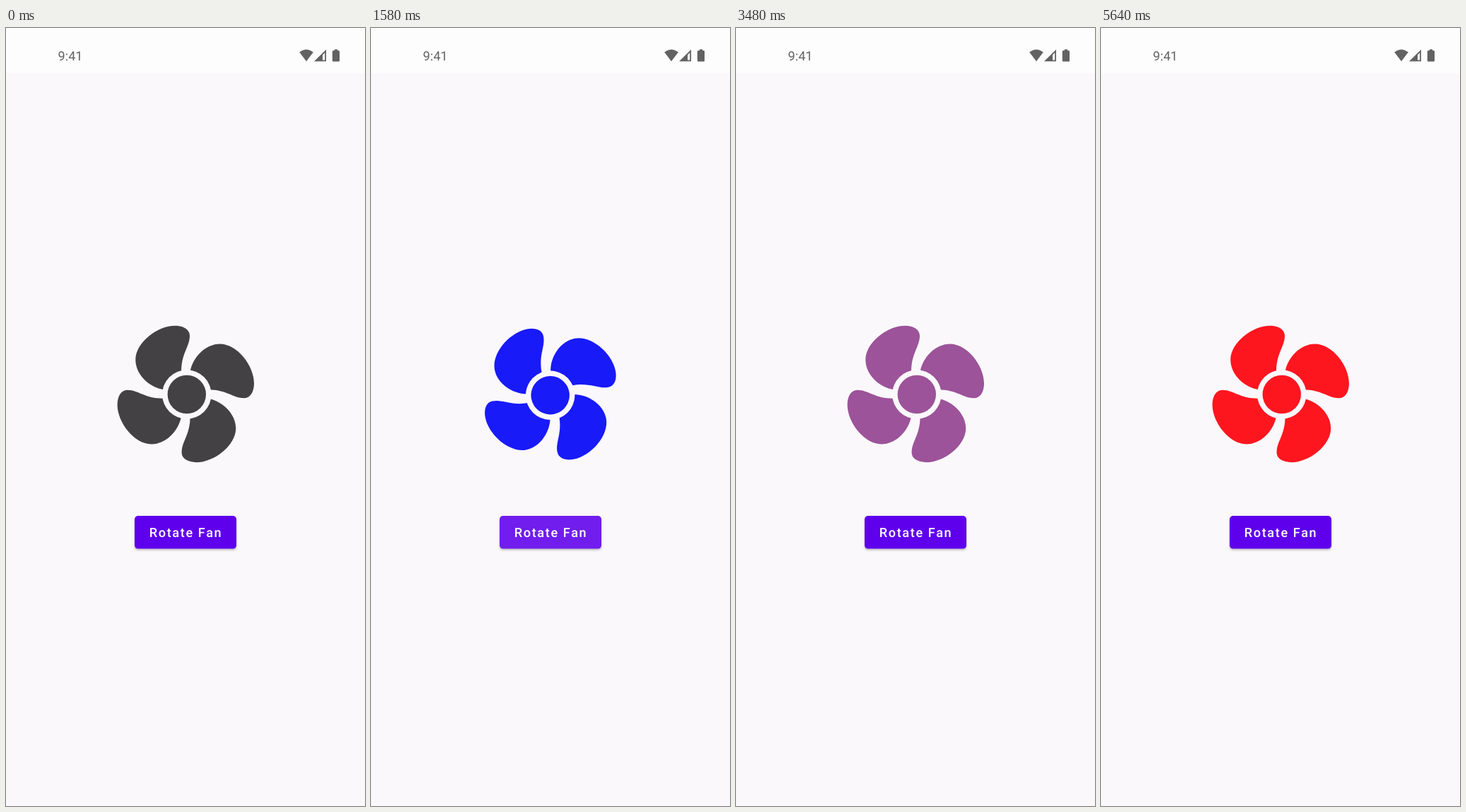
An HTML page that plays this animation: 508 by 1102 pixels, repeating every 5.7 s.

```html
<!DOCTYPE html>
<html lang="en">
<head>
<meta charset="utf-8">
<title>Rotate Fan</title>
<style>
  html, body { margin: 0; width: 100%; height: 100%; overflow: hidden; background: #faf8fb; }
  svg { display: block; width: 100%; height: 100%; }
  text { font: 18.1px Roboto, sans-serif; text-rendering: geometricPrecision; }
  .label { font-weight: 500; letter-spacing: 1.63px; fill: #fff; }
  .button { filter: drop-shadow(0 2px 1.5px rgba(0, 0, 0, .25)); }
</style>
</head>
<body>
<svg viewBox="0 0 508 1102">
  <rect width="508" height="1102" fill="#faf8fb"/>
  <rect width="508" height="64" fill="#fdfdfd"/>

  <g fill="#626262">
    <text x="73.6" y="46.2">9:41</text>
    <path d="M415.2 34.2Q425 26.6 434.8 34.2L425 47.2Z"/>
    <path fill-rule="evenodd" d="M436 47.2L453 30.4V47.2ZM448 38.2V45.4H451.2V35Z"/>
    <path d="M464.8 30.2h4.4v1.8h1.6q1.2 0 1.2 1.2v13q0 1.2-1.2 1.2h-7.8q-1.2 0-1.2-1.2v-13q0-1.2 1.2-1.2h1.8Z"/>
  </g>

  <g id="fan">
    <defs>
      <path id="blade" d="M-6.5-28L-6.3-32C-6.3-58 5.7-67 5.7-82.5C5.7-92-4-96.7-15.3-96.7
        C-40-96.7-71-73-71-48.5C-71-28-52-10-32.5-6.5L-25-5Z"/>
    </defs>
    <g transform="translate(254.3 518.5)">
      <use href="#blade"/>
      <use href="#blade" transform="rotate(90)"/>
      <use href="#blade" transform="rotate(180)"/>
      <use href="#blade" transform="rotate(270)"/>
    </g>
    <circle cx="255.8" cy="519" r="34.7" fill="#faf8fb"/>
    <circle cx="255.8" cy="519" r="27.2"/>
  </g>

  <rect class="button" x="182" y="691" width="144" height="46.6" rx="5" fill="#5f00ec"/>
  <rect id="ripple" x="182" y="691" width="144" height="46.6" rx="5" fill="#fff"/>
  <text class="label" x="202.8" y="721.4">Rotate Fan</text>
</svg>
<script>
  const LOOP = 5700;
  const CLICK = 1003;      // the fan starts to turn and to change colour
  const TURN = 2130;       // length of the single turn
  const BLUE_AT = 1590;
  const RED_AT = 5000;
  const RIPPLE = .24;

  const fan = document.getElementById('fan');
  const ripple = document.getElementById('ripple');

  const clamp = x => Math.min(1, Math.max(0, x));
  const progress = (time, start, end) => clamp((time - start) / (end - start));
  const easeIn = p => p * (.74 + .26 * p);
  const mix = (from, to, p) => `color-mix(in oklab, ${from}, ${to} ${p * 100}%)`;

  const GREY = 'rgb(67 65 67)';
  const BLUE = 'rgb(24 22 251)';
  const RED = 'rgb(254 22 31)';

  function fanColor(time) {
    return time < BLUE_AT
      ? mix(GREY, BLUE, progress(time, CLICK, BLUE_AT))
      : mix(BLUE, RED, progress(time, BLUE_AT, RED_AT));
  }

  function draw(time) {
    const angle = 360 * easeIn(progress(time, CLICK, CLICK + TURN));
    fan.setAttribute('transform', `rotate(${angle} 254 518.3)`);
    fan.style.fill = fanColor(time);
    // The press highlight appears quickly and fades slowly.
    const highlight = Math.min(progress(time, 950, 1050), 1 - progress(time, 1390, 1750));
    ripple.setAttribute('opacity', RIPPLE * highlight);
  }

  const begin = performance.now();
  function tick() {
    draw((performance.now() - begin) % LOOP);
    requestAnimationFrame(tick);
  }
  tick();
</script>
</body>
</html>
```
